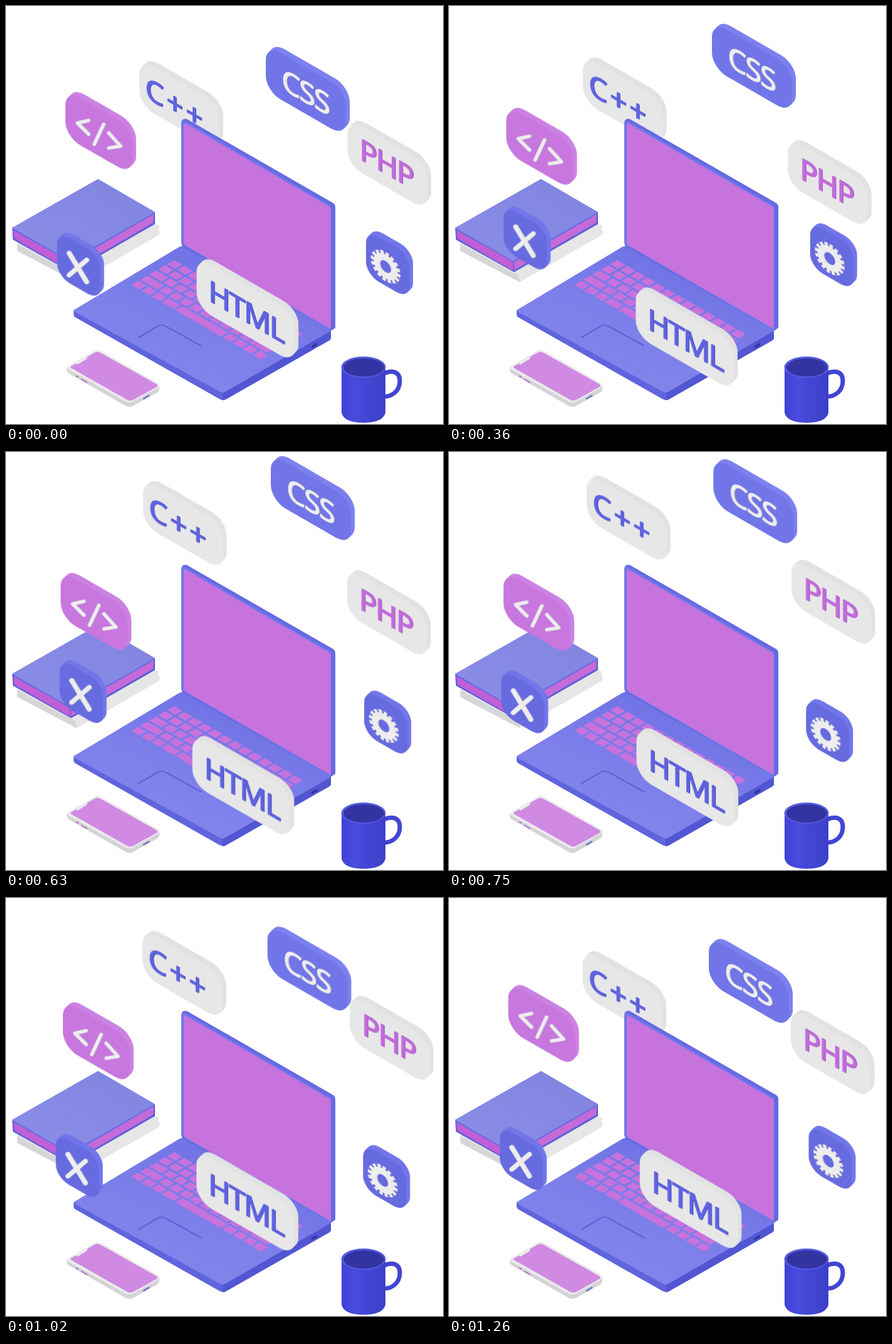
Animation of 698 by 669 pixels, one loop 1290 ms. Source, as an HTML page without scripts:

```html
<!DOCTYPE html>
<html lang="en">
<head>
<meta charset="utf-8">
<title>Coding desk</title>
<style>
  html, body { margin: 0; width: 100%; height: 100%; overflow: hidden; background: #fff; }
  svg { display: block; width: 100vw; height: 100vh; }

  .float { animation: bob 645ms cubic-bezier(.364, 0, .636, 1) infinite alternate; }
  @keyframes bob {
    from { transform: translate(-4px, 29.5px); }
    to { transform: translate(4px, -29.5px); }
  }

  /* chained shadows extrude a flat face towards the upper right */
  .slab {
    fill: var(--face);
    filter: drop-shadow(2px -1.2px 0 var(--edge)) drop-shadow(2px -1.2px 0 var(--edge)) drop-shadow(2px -1.2px 0 var(--edge));
  }
  .slab rect { transform: skewY(30deg); }
  .blue { --face: #7175e8; --edge: #7d81ee; }
  .indigo { --face: #676be0; --edge: #7276ea; }
  .pink { --face: #c777de; --edge: #cb82e2; }
  .white { --face: #e7e7e8; --edge: #e2e2e3; }

  text {
    font: 47px "Noto Sans", "Open Sans", sans-serif;
    text-anchor: middle;
    letter-spacing: -2px;
    stroke-width: 1.2;
    stroke-linejoin: round;
  }
  .raised { filter: drop-shadow(1.2px .8px 0 var(--side)); }
  .ink-white { --side: #b3b3c4; fill: #ededee; stroke: #ededee; }
  .ink-blue { --side: #3f43b4; fill: #6064e2; stroke: #6064e2; }
  .ink-pink { --side: #9149ae; fill: #c36bdd; stroke: #c36bdd; }
  .strokes { fill: none; stroke-linecap: round; stroke-linejoin: round; }
  .keys path { fill: none; stroke: #c772dd; stroke-width: 13; }
</style>
</head>
<body>
<svg viewBox="0 0 698 669" preserveAspectRatio="none">
  <defs>
    <linearGradient id="deck" x1="0" y1="1" x2=".7" y2="0">
      <stop offset="0" stop-color="#8588ec"/><stop offset=".5" stop-color="#7d80e9"/><stop offset="1" stop-color="#6b6fe3"/>
    </linearGradient>
    <linearGradient id="cover" x1="0" y1="1" x2="1" y2="0">
      <stop offset="0" stop-color="#8a8ee6"/><stop offset="1" stop-color="#8084e0"/>
    </linearGradient>
    <linearGradient id="mug">
      <stop offset="0" stop-color="#3f42d6"/><stop offset=".3" stop-color="#484bdc"/><stop offset="1" stop-color="#3c3fc6"/>
    </linearGradient>
  </defs>

  <g id="books">
    <path fill="#e6e6e7" d="M18 380 147 305 245 352 243 357 246 361 245 366 113 442 18 392Z"/>
    <path fill="#d6d6d9" d="M18 381 111 431 113 442 18 392Z"/>
    <path fill="#5c60d8" d="M10 355 238 331 238 349 104 426 11 374Z"/>
    <path fill="#c05fd6" d="M12 358 102 409 103 424 13 372Z"/>
    <path fill="#c46bd8" d="M104 409 236 333 235 347 104 423Z"/>
    <path fill="#666ae2" d="M10 355 147 277 238 330 238 332 103 410 10 358Z"/>
    <path fill="url(#cover)" d="M10 355 147 277 238 330 102 408Z"/>
  </g>

  <g transform="translate(216 69)"><g class="float" style="animation-delay:-1137ms">
    <g class="slab white"><rect y="-6.7" width="128" height="74.6" rx="24"/></g>
    <g class="raised ink-blue"><text transform="matrix(1 .577 0 1 57 66)" y="17" style="letter-spacing:4px">C++</text></g>
  </g></g>

  <g id="laptop">
    <path fill="#6064dd" d="M108 487 281 384 519 520 519 531Q519 534 515 536L352 629Q347 632 341 629L112 499Q108 497 108 493Z"/>
    <path fill="#5256d2" d="M346 619 519 520 519 531Q519 534 515 536L352 629Q349 631 346 631Z"/>
    <path fill="url(#deck)" d="M113 484 276 386Q281 383 286 386L519 520 351 617Q346 620 341 617L111 490Q106 487 113 484Z"/>
    <path fill="#2f3399" d="M488 544 497 539 497 543 488 548Z"/>
    <path fill="none" stroke="#5458ce" stroke-width="1.5" d="M211 531 243 512Q248 509 254 512L312 544"/>
    <g class="keys" transform="matrix(.866 .5 -.866 .5 270 406)">
      <path stroke-dasharray="15 3.5" d="M0 8H241M0 24.5H241"/>
      <path stroke-dasharray="22 3.5 15 3.5 15 3.5 15 3.5 15 3.5 15 3.5 15 3.5 15 3.5 15 3.5 15 3.5 15 3.5 24" d="M0 41H241"/>
      <path stroke-dasharray="31 3.5 15 3.5 15 3.5 15 3.5 15 3.5 15 3.5 15 3.5 15 3.5 15 3.5 15 3.5 33" d="M0 57.500H241"/>
      <path stroke-dasharray="15 3.5 15 3.5 15 3.5 22 3.5 84 3.5 15 3.5 15 3.5 15 3.5 15" d="M0 74H241"/>
    </g>
    <path fill="#666ae2" d="M280 187Q281 179 289 181L522 315Q526 317 526 322V515L519 520 284 386Q280 383 280 378Z"/>
    <path fill="#7478ea" d="M281 187Q282 182 287 185L519 320V519L286 384Q281 382 281 377Z"/>
    <path fill="#c673dd" d="M284 190Q284 187 288 189L516 321Q519 323 519 326V517L288 384Q284 381 284 378Z"/>
  </g>

  <g id="phone">
    <path fill="#d4d4d7" d="M97 578Q96 586 102 589L191 640Q197 643 203 640L241 619Q246 616 245 607Z"/>
    <path fill="#ebebec" d="M100 576 141 552Q146 549 152 552L242 603Q248 607 242 611L203 633Q197 636 191 633L100 582Q94 579 100 576Z"/>
    <path fill="#d08ae2" d="M105 576 141 555Q146 552 151 555L240 605Q244 608 240 610L204 630Q198 633 193 630L105 580Q101 578 105 576Z"/>
    <path fill="none" stroke="#ebebec" stroke-width="5" stroke-linecap="round" d="M114 571 127 563"/>
    <path stroke="#6b6fc4" stroke-width="2.5" d="M219 629 229 623"/>
    <path stroke="#b76bcc" stroke-width="2" d="M112 592 116 594M120 597 130 603"/>
  </g>

  <g id="cup">
    <path fill="none" stroke="#4245d2" stroke-width="7" d="M604 588C616 583 629 584 629 600C629 616 617 625 604 625"/>
    <path fill="url(#mug)" d="M536 578V651Q540 667 571 667T606 651V578Z"/>
    <ellipse cx="571" cy="578" rx="35.5" ry="17" fill="#5659e0"/>
    <ellipse cx="571.5" cy="578.5" rx="32.5" ry="14.5" fill="#3234a2"/>
  </g>

  <g transform="translate(419 38.7)"><g class="float" style="animation-delay:-15ms">
    <g class="slab blue"><rect y="-6.7" width="128" height="74.6" rx="24"/></g>
    <g class="raised ink-white"><text transform="matrix(1 .577 0 1 63 69)" y="17">CSS</text></g>
  </g></g>

  <g transform="translate(545 188)"><g class="float" style="animation-delay:-955ms">
    <g class="slab white"><rect y="-6.7" width="128" height="74.6" rx="24"/></g>
    <g class="raised ink-pink"><text transform="matrix(1 .577 0 1 62 66)" y="17">PHP</text></g>
  </g></g>

  <g transform="translate(91 168.5)"><g class="float" style="animation-delay:-585ms">
    <g class="slab pink"><rect y="-6.7" width="107" height="75.6" rx="24"/></g>
    <g class="raised ink-white"><path class="strokes" style="stroke-width:5.5" d="M37 43 19 47 37 65M61 49 46 81M69 63 88 84 69 87"/></g>
  </g></g>

  <g transform="translate(83.5 351.5)"><g class="float" style="animation-delay:-220ms">
    <g class="slab indigo"><rect y="-5" width="69" height="71.6" rx="20"/></g>
    <g class="raised ink-white"><path class="strokes" style="stroke-width:7.5" d="M19 30 47 76M47 41 19 65"/></g>
  </g></g>

  <g transform="translate(573.5 374.7)"><g class="float" style="animation-delay:-405ms">
    <g class="slab indigo"><rect y="-5" width="69" height="71.6" rx="20"/></g>
    <g class="raised ink-white"><g transform="matrix(1 .577 0 1 31 54)" fill="none">
      <circle r="14" stroke-width="10"/>
      <circle r="20.5" stroke-width="6" pathLength="96" stroke-dasharray="3.5 2.5"/>
    </g></g>
  </g></g>

  <g transform="translate(301 432)"><g class="float" style="animation-delay:-770ms">
    <g class="slab white"><rect y="-6.7" width="157" height="80.6" rx="24"/></g>
    <g class="raised ink-blue"><text transform="matrix(1 .577 0 1 79 81)" y="17">HTML</text></g>
  </g></g>
</svg>
</body>
</html>
```
